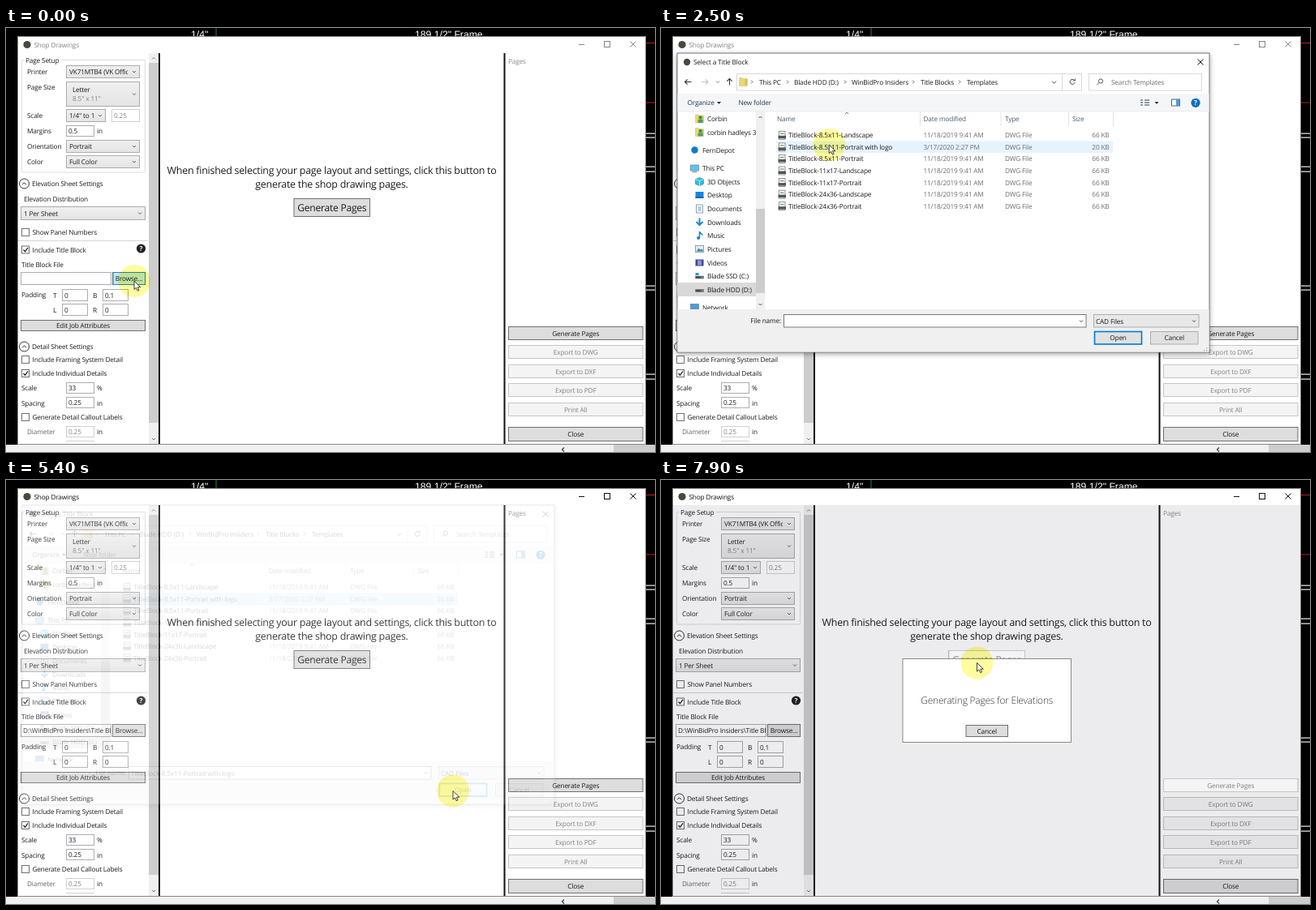
An HTML page for the animation above (8 s loop, 800 by 523 pixels).

```html
<!DOCTYPE html>
<html lang="en">
<head>
<meta charset="utf-8">
<title>Shop Drawings</title>
<style>
html, body { margin: 0; width: 100%; height: 100%; overflow: hidden; background: #000; }
svg { display: block; width: 800px; height: 523px; }
text { font-family: "Open Sans", "Noto Sans", sans-serif; font-size: 8.25px; letter-spacing: -.02em;
  fill: #1c1c1c; text-rendering: geometricPrecision; white-space: pre; }
.cad { font-family: "Liberation Sans", Arial, sans-serif; font-size: 12.2px; letter-spacing: 0; fill: #fff; }
.big { font-size: 12.45px; }
.mid { font-size: 12.1px; }
.thin { font-size: 12px; font-weight: 300; }
#glow { mix-blend-mode: multiply; }
</style>
</head>
<body>
<svg id="stage" viewBox="0 0 800 523" xmlns="http://www.w3.org/2000/svg"></svg>
<script>
const GREY = '#838383', EDGE = '#707070', BLUE = '#0078d7';
const LOOP = 8000;

// Drawing helpers: each returns markup
const box = (x1, y1, x2, y2, fill = '#fff', stroke = 'none', w = 1, more = '') =>
  `<rect x="${x1}" y="${y1}" width="${x2 - x1}" height="${y2 - y1}" fill="${fill}" stroke="${stroke}" stroke-width="${w}" ${more}/>`;
const path = (d, stroke = '#444', w = 1, fill = 'none') =>
  `<path d="${d}" stroke="${stroke}" stroke-width="${w}" fill="${fill}"/>`;
const dot = (x, y, r, fill, stroke = 'none', w = 1) =>
  `<circle cx="${x}" cy="${y}" r="${r}" fill="${fill}" stroke="${stroke}" stroke-width="${w}"/>`;
const text = (x, cy, s, fill = '', cls = '', anchor = 'start', more = '') =>
  `<text x="${x}" y="${cy + (cls ? 4.4 : 3)}" class="${cls}" text-anchor="${anchor}" ${fill && `style="fill:${fill}"`} ${more}>${s}</text>`;
const group = (id, body, more = '') => `<g id="${id}" ${more}>${body}</g>`;
const clip = (id, x1, y1, x2, y2) => `<clipPath id="${id}">${box(x1, y1, x2, y2)}</clipPath>`;
const down = (x, y, c = '#555', s = 2) => path(`M${x - s} ${y - s / 2}l${s} ${s} ${s} ${-s}`, c);
const up = (x, y, c = '#555', s = 2) => path(`M${x - s} ${y + s / 2}l${s} ${-s} ${s} ${s}`, c);
const right = (x, y) => path(`M${x - 1} ${y - 2}l2 2-2 2`, '#555', .9);
const field = (x1, y1, x2, y2, s = '', c = '') =>
  box(x1 + .5, y1 + .5, x2 - .5, y2 - .5, '#fff', c ? '#d0d0d0' : '#abadb3') + text(x1 + 3, (y1 + y2) / 2, s, c);
const combo = (x1, y1, x2, y2, s, more = '') =>
  box(x1 + .5, y1 + .5, x2 - .5, y2 - .5, 'url(#face)', '#acacac') +
  down(x2 - 7, (y1 + y2) / 2, '#606060') + text(x1 + 4, (y1 + y2) / 2, s, '', '', 'start', more);
const button = (x1, y1, x2, y2, s, off = false, cls = '') =>
  box(x1 + .5, y1 + .5, x2 - .5, y2 - .5, off ? '#f4f4f4' : '#ddd', off ? '#c4c6c9' : EDGE) +
  text((x1 + x2) / 2, (y1 + y2) / 2, s, off ? GREY : '', cls, 'middle');
const check = (cy, s, on) => box(19.5, cy - 4.5, 28.5, cy + 4.5, '#fff', EDGE) +
  (on ? path(`M21.5 ${cy}l2 2.3 3.5-5`, '#222', 1.3) : '') + text(32.5, cy, s);
const expander = (cy, s) => dot(22.5, cy, 6, '#fff', '#333') + up(22.5, cy, '#222', 2.5) + text(32, cy, s);
const folder = (x, y) => path(`M${x - 5} ${y - 5}h4l1 1h5v9h-10z`, '#d9c25c', .6, '#ecd873') +
  box(x + 2, y - 3, x + 4.5, y + 4, '#bcc86c');

function backdrop() {
  const lines = [130, 135, 171, 177, 318, 323, 427, 433].map(y => box(789, y - .5, 800, y + .7, '#eee')).join('');
  return box(0, 0, 800, 523, '#000') +
    text(228, 7.6, '1/4"', '', 'cad') + text(504, 7.6, '189 1/2" Frame', '', 'cad') +
    box(258.5, 0, 259.5, 11, '#198a2c') +
    box(789, 18, 800, 19, '#c31818') + box(789, 91.5, 800, 92.5, '#c31818') + lines +
    box(0, 514, 800, 523, '#f0f0f0') + box(749, 514, 800, 523, '#cdcdcd') +
    path('M688 517.5l-2.5 2.5 2.5 2.5', '#444', 1.3);
}

function sidebar() {
  const labels = [[26, 54, 'Printer'], [26, 73, 'Page Size'], [26, 108, 'Scale'], [26, 127, 'Margins'],
    [112, 127, 'in'], [26, 146, 'Orientation'], [26, 165, 'Color'], [22, 211, 'Elevation Distribution'],
    [19, 292, 'Title Block File'], [19, 329, 'Padding'], [58, 329.5, 'T'], [107, 329.5, 'B'],
    [58, 348, 'L'], [107, 348, 'R'], [19, 444, 'Scale'], [112, 444, '%'], [19, 463, 'Spacing'], [112, 463, 'in'],
    [112, 498, 'in']].map(l => text(...l)).join('');
  return box(19.5, 39.5, 171.5, 178, 'none', '#dcdcdc', 1, 'rx="1.5"') + box(22, 36, 68, 43) + text(24, 39.5, 'Page Setup') +
    labels + combo(74, 46, 165, 62, 'VK71MTB4 (VK Office', 'clip-path="url(#cPrinter)"') +
    combo(74, 66, 165, 97, '') + text(82, 76, 'Letter') + text(82, 87, '8.5" x 11"', GREY) +
    combo(74, 100, 123, 116, '1/4" to 1', 'clip-path="url(#cScale)"') + field(130, 100, 165, 116, '0.25', GREY) +
    field(74, 120, 109, 134, '0.5') + combo(74, 138, 165, 154, 'Portrait') + combo(74, 157, 165, 173, 'Full Color') +
    expander(192, 'Elevation Sheet Settings') + combo(18, 220, 172, 237, '1 Per Sheet') +
    check(252, 'Show Panel Numbers') + box(15, 262, 175, 263, '#d5d5d5') +
    check(273.5, 'Include Title Block', true) + dot(166.5, 272, 5.6, '#222') +
    text(166.5, 272, '?', '#fff', '', 'middle', 'font-weight="700"') +
    field(18, 301, 130, 317) + text(21, 309, 'D:\\WinBidPro Insiders\\Title Blocks', '', '', 'start', 'id="filePath" clip-path="url(#cPath)"') +
    button(131, 301, 172, 317, 'Browse...') +
    group('browseHot', box(132, 301.5, 171.5, 316.5, '#bee6fd', '#3c7fb1') + text(151.5, 309, 'Browse...', '', '', 'middle')) +
    field(69, 322, 101, 337, '0') + field(119, 322, 151, 337, '0.1') + field(69, 340, 101, 355, '0') + field(119, 340, 151, 355, '0') +
    button(18, 360, 172, 374, 'Edit Job Attributes') +
    expander(393, 'Detail Sheet Settings') + check(409, 'Include Framing System Detail') +
    check(426, 'Include Individual Details', true) +
    field(74, 437, 109, 451, '33') + field(74, 455, 109, 469, '0.25') +
    check(480, 'Generate Detail Callout Labels') + text(26, 498, 'Diameter', '#666') + field(74, 491, 109, 505, '0.25', GREY) +
    box(74, 509, 109, 510, '#d0d0d0') +
    box(176, 31, 188, 513, '#f0f0f0') + box(176, 43, 188, 487, '#cdcdcd') + up(182, 37.5, '#777') + down(182, 507, '#777');
}

function appWindow() {
  const controls = c => path('M706 20.5h7', c) + box(737.5, 16.5, 744.5, 23.5, 'none', c) +
    path('M769.5 16.5l7 7m0-7l-7 7', c) + text(34.5, 20.5, 'Shop Drawings', c);
  const exports = [['Export to DWG', 391], ['Export to DXF', 415], ['Export to PDF', 438], ['Print All', 462]]
    .map(([s, y]) => button(619, y, 785.5, y + 17, s, true)).join('');
  return box(14, 10, 789, 514) + dot(26, 20.5, 4.6, '#4b463e') +
    group('idle', controls('#858585')) + group('active', controls('#111')) +
    sidebar() + box(188, 31, 190, 513, '#111') + box(613.5, 31, 615.5, 513, '#111') +
    text(401.5, 176, 'When finished selecting your page layout and settings, click this button to', '', 'big', 'middle') +
    text(401.5, 192.3, 'generate the shop drawing pages.', '', 'big', 'middle') +
    button(354.5, 210, 449, 233, 'Generate Pages', false, 'mid') +
    group('genHot', box(355, 210.5, 448.5, 232.5, '#bee6fd', '#3c7fb1') +
      text(401.7, 221.5, 'Generate Pages', '', 'mid', 'middle')) +
    text(619, 41, 'Pages', '#8a8a8a') + button(619, 368, 785.5, 385, 'Generate Pages') + exports +
    button(619, 492, 785.5, 510, 'Close') +
    path('M14.5 513.5V10.5H788.5V513.5z', '#555', .7);
}

function navIcon(kind, x, y) {
  const screen = c => box(x - 5, y - 4, x + 5, y + 3, c, '#5a7f98', .7) + box(x - 3, y + 4, x + 3, y + 5, '#6d8496');
  const drive = box(x - 5, y, x + 5, y + 3, '#484c50', '#777', .5) + box(x + 2, y + 1, x + 4, y + 2, '#8ce0a0');
  return {
    user: () => folder(x, y) + dot(x + 1, y - 1.5, 2.2, '#3f8f54') + box(x - 2, y + 1, x + 4, y + 5, '#4f9e63'),
    cloud: () => dot(x, y, 4.2, '#1079cf'),
    pc: () => screen('#62c2ee'),
    cube: () => path(`M${x} ${y - 5}l5 2v6l-5 2-5-2v-6z`, '#168aa8', .6, '#36bcd9') + path(`M${x - 5} ${y - 3}l5 2 5-2M${x} ${y - 1}v6`, '#d9f6fc', .8),
    desk: () => box(x - 5, y - 4, x + 5, y + 4, '#1685dc') + box(x - 5, y + 2.5, x + 5, y + 4, '#0b5fa6'),
    doc: () => box(x - 4, y - 5, x + 4, y + 5, '#fff', '#7c8b98', .8) + path(`M${x - 2} ${y - 2}h4m-4 2h4m-4 2h4`, '#4c94c9', .9),
    load: () => path(`M${x} ${y - 5}v8m-4-3.5l4 4 4-4`, '#1e88d2', 2),
    note: () => path(`M${x} ${y + 3}v-8q1 3 4 4`, '#1b80cb', 1.5) + dot(x - 1.4, y + 3, 2, '#1b80cb'),
    pic: () => box(x - 5, y - 4, x + 5, y + 4, '#dff1fb', '#7c8b98', .8) + path(`M${x - 4} ${y + 3}l3-4 2 2 2-1 2 3z`, 'none', 0, '#3f85a6'),
    film: () => box(x - 5, y - 4, x + 5, y + 4, '#4b3f86') + box(x - 2.5, y - 3, x + 2.5, y + 3, '#7a9be0'),
    ssd: () => drive + box(x - 5, y - 4, x - 1, y - 1, '#1e9ae0'),
    hdd: () => drive,
    net: () => screen('#4e9cd8')
  }[kind]();
}

function navPane() {
  const items = [['user', 112, 'Corbin', 57], ['user', 128.5, 'corbin hadleys 352', 57], ['cloud', 150.5, 'FernDepot', 51],
    ['pc', 173, 'This PC', 51], ['cube', 189.5, '3D Objects', 57], ['desk', 206, 'Desktop', 57],
    ['doc', 223, 'Documents', 57], ['load', 239.5, 'Downloads', 57], ['note', 256, 'Music', 57],
    ['pic', 272.5, 'Pictures', 57], ['film', 289.5, 'Videos', 57], ['ssd', 306, 'Blade SSD (C:)', 57],
    ['hdd', 322.5, 'Blade HDD (D:)', 57], ['net', 344.5, 'Network', 51]];
  return box(20, 314, 117, 331, '#d9d9d9') +
    `<g clip-path="url(#cNav)">${items.map(([k, y, s, x]) => navIcon(k, x - 9.5, y) + text(x, y, s)).join('')}</g>` +
    box(117, 103, 128, 347, '#f0f0f0') + box(117, 223, 128, 327, '#cdcdcd') + up(122.5, 110) + down(122.5, 341);
}

function fileList() {
  const names = ['8.5x11-Landscape', '8.5x11-Portrait with logo', '8.5x11-Portrait', '11x17-Landscape',
    '11x17-Portrait', '24x36-Landscape', '24x36-Portrait'];
  const row = (y, name, date, type, size) => text(157, y, name) + text(323.5, y, date, '#6d6d6d') +
    text(424, y, type, '#6d6d6d') + text(552.5, y, size, '#6d6d6d', '', 'end');
  const page = y => box(145.5, y - 5, 153, y + 5, '#fff', '#777', .8) + path(`M147 ${y - 2}h4.5`, '#4d9b63', 1.2) +
    box(144.5, y + .5, 154, y + 4, '#555');
  const rows = names.map((n, i) => {
    const y = 132.3 + i * 14.57, own = i === 1;
    return page(y) + row(y, 'TitleBlock-' + n, own ? '3/17/2020 2:27 PM' : '11/18/2019 9:41 AM', 'DWG File', own ? '20 KB' : '66 KB');
  }).join('');
  const heads = [[143, 'Name'], [323.5, 'Date modified'], [424, 'Type'], [507, 'Size']].map(([x, s]) => text(x, 112, s, '#4c5c70')).join('');
  const rules = [319, 418.5, 502, 557].map(x => box(x, 103, x + 1, 121, '#e3e3e3')).join('');
  return heads + rules + up(229, 105, '#777') +
    group('outer', folder(149, 132) + row(132.3, 'Templates', '3/17/2020 2:27 PM', 'File folder', '')) +
    group('inner', group('rowHot', box(142, 139.5, 557, 154, '#e5f3ff')) +
      group('rowOn', box(142.5, 140, 556.5, 153.7, '#cce8ff', '#a6d8ff', .8)) + rows);
}

function dialog() {
  const crumbs = [[112, 121, 'This PC'], [156, 164, 'Blade HDD (D:)'], [227, 235, 'WinBidPro Insiders'], [311, 320, 'Title Blocks']]
    .map(([a, x, s]) => right(a, 66.5) + text(x, 66.5, s)).join('') + right(368, 66.5);
  const arrow = (x, dir, c) => path(`M${x + 4 * dir} 66.5h${-8 * dir}m${3 * dir}-3l${-3 * dir} 3 ${3 * dir} 3`, c, 1.1);
  return box(20, 31, 676, 400, '#fff', '#555', .8, 'filter="url(#shadow)"') + dot(32, 42, 4.2, '#4b463e') +
    text(40, 42, 'Select a Title Block') + path('M661.5 38.5l7 7m0-7l-7 7', '#111') +
    group('backOff', arrow(33.5, 1, '#c4c4c4')) + group('backOn', arrow(33.5, 1, '#333')) + arrow(54, -1, '#c4c4c4') +
    down(70, 66.5, '#777') + path('M84.5 70.5v-8m-3.2 3.2l3.2-3.2 3.2 3.2', '#333', 1.1) +
    box(93.5, 56.5, 494.5, 77, '#fff', '#d9d9d9') + box(494.5, 56.5, 518.5, 77, '#fff', '#d9d9d9') +
    folder(101.5, 66.5) + crumbs + group('crumb', text(377, 66.5, 'Templates')) + down(484.5, 67, '#444', 2.5) +
    path('M509.5 64.5a3 3 0 1 0 .6 2.5M510.3 62.5v2.4h-2.5', '#444') +
    box(527.5, 56.5, 666.5, 77, '#fff', '#d9d9d9') + dot(542, 65.5, 2.6, 'none', '#555') + path('M540 67.5l-2.5 2.6', '#555') +
    group('findA', text(555, 66.5, 'Search Title Blocks', '#6d6d6d')) + group('findB', text(555, 66.5, 'Search Templates', '#6d6d6d')) +
    box(20.5, 81, 675.5, 103, '#f5f6f7') + box(20.5, 102.5, 675.5, 103.2, '#e6e7e8') +
    text(32.5, 92, 'Organize', '#1e395b') + path('M69 91h5l-2.5 3z', 'none', 0, '#1e395b') + text(95.5, 92, 'New folder', '#1e395b') +
    path('M591 89h3m-3 3h3m-3 3h3M596 89h6m-6 3h6m-6 3h6', '#6b7f92', 1.3) + path('M608.5 91h5l-2.5 3z', 'none', 0, '#1e395b') +
    box(629.5, 88, 639.5, 96, '#fff', '#45698c') + box(635, 88, 639.5, 96, '#4f9bd8') +
    dot(659, 92.3, 5.6, '#0c6fbd') + text(659, 92.3, '?', '#fff', '', 'middle', 'font-weight="700"') +
    navPane() + fileList() + box(20.5, 347, 675.5, 399.5, '#f0f0f0') +
    text(148, 361, 'File name:', '', '', 'end') + box(151.5, 353.5, 524, 369, '#fff', '#7a7a7a') +
    group('focus', box(151.5, 353.5, 524, 369, 'none', BLUE)) + group('chosen', text(154, 361.5, 'TitleBlock-8.5x11-Portrait with logo')) +
    down(518, 361.5, '#444') + box(533.5, 353.5, 663, 369, '#e8e8e8', '#adadad') + text(536, 361.5, 'CAD Files') + down(657, 361.5, '#444') +
    box(534.5, 374.5, 592.5, 390, '#e1e1e1', BLUE, 1.6) + group('openHot', box(535.5, 375.5, 591.5, 389, '#e5f1fb')) +
    text(563.5, 382.3, 'Open', '', '', 'middle') + box(603.5, 374.5, 662, 390, '#e1e1e1', '#adadad') +
    text(632.7, 382.3, 'Cancel', '', '', 'middle') +
    [[672, 397], [669, 397], [672, 394]].map(([x, y]) => box(x, y, x + 1.3, y + 1.3, '#aaa')).join('');
}

const tooltip = () => box(211.5, 156.5, 343, 189, '#fff', '#767676', 1, 'filter="url(#shadow)"') +
  ['Type: DWG File', 'Size: 19.5 KB', 'Date modified: 3/17/2020 2:27 PM'].map((s, i) => text(215, 162.3 + i * 10.4, s, '#575757')).join('');

const busy = () => box(15, 31, 788, 513, '#141428', 'none', 0, 'opacity=".08"') +
  button(354.5, 210, 449, 233, 'Generate Pages', true, 'mid') + box(619, 368, 785.5, 385, '#ebebee') +
  button(619, 368, 785.5, 385, 'Generate Pages', true) +
  box(298, 220.5, 505.5, 323.5, '#fff', '#8a8a8a') +
  text(401.7, 272, 'Generating Pages for Elevations', '#333', 'thin', 'middle') + button(375.5, 302, 428, 317, 'Cancel');

const stage = document.getElementById('stage');
stage.innerHTML = `<defs>
  <linearGradient id="face" x2="0" y2="1"><stop stop-color="#f0f0f0"/><stop offset="1" stop-color="#e4e4e4"/></linearGradient>
  <filter id="shadow" x="-10%" y="-10%" width="120%" height="125%"><feDropShadow dx="0" dy="2" stdDeviation="3" flood-opacity=".35"/></filter>
  ${clip('cPrinter', 74, 46, 150, 62)}${clip('cScale', 74, 100, 109, 116)}${clip('cPath', 19, 301, 129, 317)}${clip('cNav', 20, 103, 117, 347)}
</defs>` + backdrop() + appWindow() + group('dialog', dialog()) + group('tip', tooltip()) + group('busy', busy()) +
  group('glow', dot(0, 0, 20, '#fffb9f')) +
  group('arrow', path('M0 0v10.6l2.5-2.3 1.7 3.9 1.8-.8-1.7-3.7h3.5z', '#111', .8, '#fff'));

// Visibility spans: id, from, to, fade-in, fade-out (ms)
const spans = [
  ['idle', 0, 5300], ['active', 5300, LOOP], ['browseHot', 0, 800], ['dialog', 600, 5300, 180, 120],
  ['focus', 600, 2300], ['outer', 0, 2300], ['inner', 2300, LOOP], ['backOff', 0, 2300], ['backOn', 2300, LOOP],
  ['crumb', 2300, LOOP], ['findA', 0, 2300], ['findB', 2300, LOOP], ['rowHot', 2300, 3900], ['rowOn', 3900, LOOP],
  ['chosen', 3900, LOOP], ['tip', 3000, 3900, 150, 0], ['openHot', 4900, LOOP], ['filePath', 5300, LOOP],
  ['genHot', 6820, 7450], ['busy', 7450, LOOP]
].map(([id, ...s]) => [document.getElementById(id), ...s]);

// Pointer stops: time, x, y
const stops = [[0, 158, 312], [700, 158, 312], [1700, 187.5, 141], [2350, 187.5, 141], [2700, 237, 148.5], [4350, 237, 148.5],
  [4600, 421, 259.5], [5000, 551, 383.5], [6250, 551, 383.5], [7000, 389.5, 225.5], [LOOP, 389.5, 225.5]];
const ease = p => p * p * (3 - 2 * p);
const quick = [p => p * (2 - p) * .3 + p * .7, p => p * (2 - p)];

function pointer(t) {
  const i = stops.findIndex(s => s[0] > t), [t0, x0, y0] = stops[i - 1], [t1, x1, y1] = stops[i];
  const p = (t - t0) / (t1 - t0), curve = t0 === 4350 ? quick[0] : t0 === 4600 ? quick[1] : ease;
  const k = curve(p);
  return [x0 + (x1 - x0) * k, y0 + (y1 - y0) * k];
}

const glow = document.getElementById('glow'), arrow = document.getElementById('arrow');
const unit = v => Math.max(0, Math.min(1, v));

function draw(now) {
  const t = Math.max(0, now) % LOOP;
  for (const [el, from, to, fadeIn = 0, fadeOut = 0] of spans) {
    const a = t < from ? 0 : fadeIn ? unit((t - from) / fadeIn) : 1;
    const b = t < to ? 1 : fadeOut ? unit(1 - (t - to) / fadeOut) : 0;
    el.style.opacity = a * b;
  }
  const move = `translate(${pointer(t)})`;
  glow.setAttribute('transform', move);
  arrow.setAttribute('transform', move);
  requestAnimationFrame(draw);
}
draw(performance.now());
</script>
</body>
</html>
```
